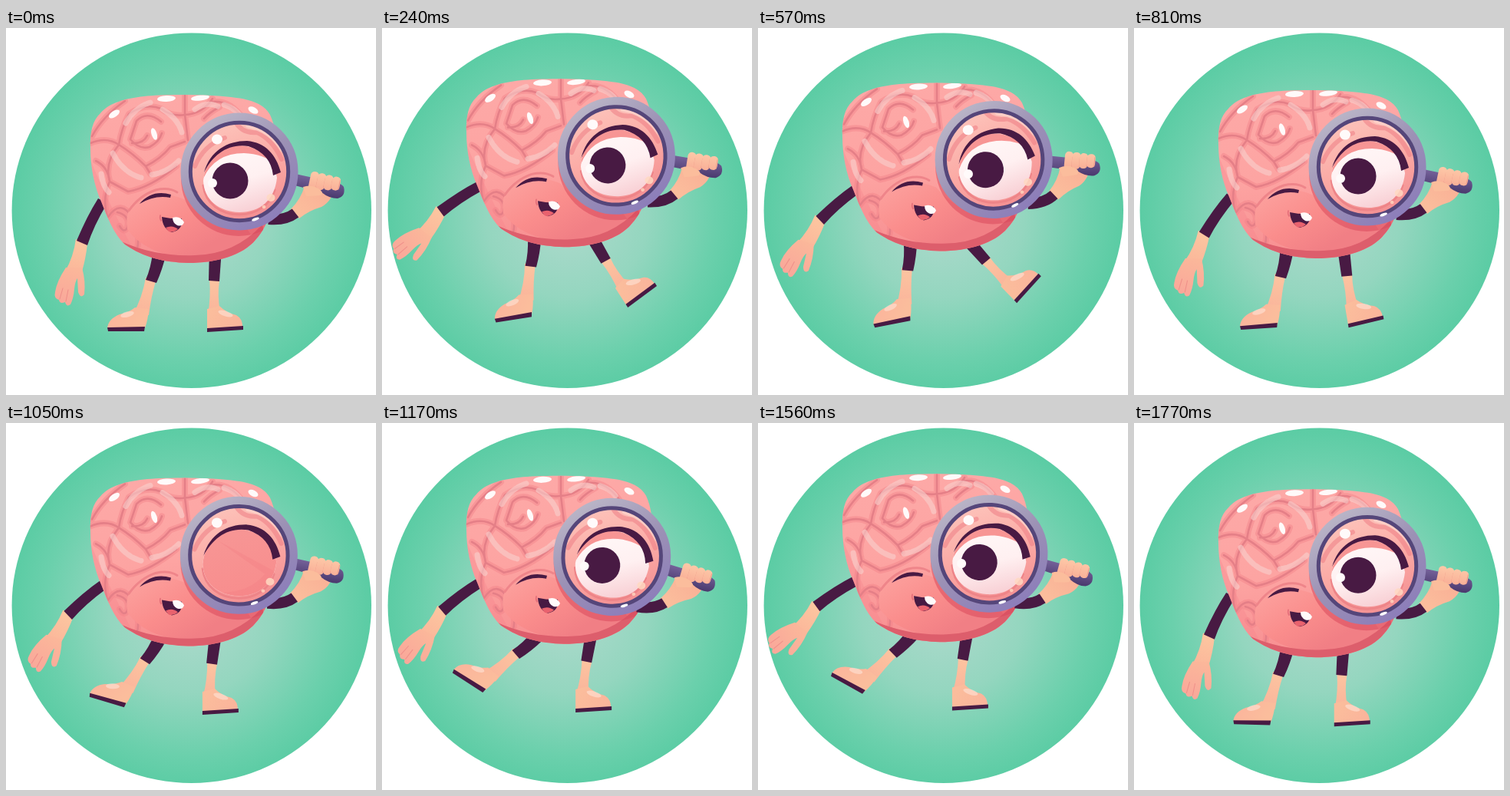
An HTML page with a canvas for the animation above (1800 ms loop, 482 px wide and 478 px high).

```html
<!DOCTYPE html>
<html lang="en">
<head>
<meta charset="utf-8">
<title>Curious brain</title>
<style>
html, body { margin: 0; width: 100%; height: 100%; overflow: hidden; background: #fff; }
canvas { display: block; }
</style>
</head>
<body>
<canvas id="stage" width="482" height="478"></canvas>
<script>
const ctx = document.getElementById('stage').getContext('2d');
const LOOP = 1800, STEP = 30;
const INK = '#481a43', SKIN = '#fbbd9c', SKIN_PINK = '#f9a79a', WHITE = '#fffafa';
const LENS = { x: 304, y: 187 };

const rad = d => d * Math.PI / 180;
const clamp = v => Math.max(0, Math.min(1, v));
const smooth = v => v * v * (3 - 2 * v);

function ramp(x0, y0, x1, y1, ...colors) {
  const g = ctx.createLinearGradient(x0, y0, x1, y1);
  colors.forEach((c, i) => g.addColorStop(i / (colors.length - 1), c));
  return g;
}
function fill(d, color) {
  ctx.fillStyle = color;
  ctx.fill(new Path2D(d));
}
function line(d, color, width, cap = 'round') {
  ctx.strokeStyle = color;
  ctx.lineWidth = width;
  ctx.lineCap = cap;
  ctx.lineJoin = 'round';
  ctx.stroke(new Path2D(d));
}
function oval(x, y, rx, ry, color, turn = 0) {
  ctx.beginPath();
  ctx.ellipse(x, y, rx, ry, rad(turn), 0, Math.PI * 2);
  ctx.fillStyle = color;
  ctx.fill();
}
function ring(r, width, color) {
  ctx.beginPath();
  ctx.arc(LENS.x, LENS.y, r, 0, Math.PI * 2);
  ctx.strokeStyle = color;
  ctx.lineWidth = width;
  ctx.stroke();
}
function group(draw) {
  ctx.save();
  draw();
  ctx.restore();
}
function pivot(x, y, deg) {
  ctx.translate(x, y);
  ctx.rotate(rad(deg));
  ctx.translate(-x, -y);
}

// Two hops in every 900 ms: low, high, low, high, low
function hop(t) {
  const keys = [0, 225, 420, 645, 900], u = t % 900;
  const i = keys.findIndex((k, n) => u >= k && u < keys[n + 1]);
  const v = smooth((u - keys[i]) / (keys[i + 1] - keys[i]));
  return i % 2 ? 1 - v : v;
}

function pose(t) {
  const s = Math.sin(2 * Math.PI * t / LOOP);
  const fwd = Math.max(s, 0), back = Math.max(-s, 0);
  const f4 = fwd ** 4, b4 = back ** 4;
  return {
    h: hop(t),
    left: 45 * back ** 1.45 - 12 * fwd,
    right: 9 * back - 50 * fwd ** 1.4,
    ankle: -9 * back,
    lensX: 4.5 * f4 - 10 * b4,
    lensY: 13 * b4,
    lensTurn: 11 * b4 - 9 * f4,
    blink: clamp(1 - (Math.abs(t - 1050) - 40) / 80)
  };
}

function backdrop() {
  ctx.fillStyle = '#fff';
  ctx.fillRect(0, 0, 482, 478);
  const g = ctx.createRadialGradient(241, 250, 20, 241, 240, 234);
  g.addColorStop(0, '#a9d9ca');
  g.addColorStop(.4, '#94d6bf');
  g.addColorStop(.8, '#6bd0ac');
  g.addColorStop(1, '#5bcca4');
  oval(241.8, 237.7, 234.2, 231.3, g);
}

function legs(p) {
  group(() => {
    pivot(199, 300, p.left);
    fill('M182 325L195 330Q189 350 186 374L165 374Q178 350 182 325Z', ramp(188, 328, 172, 374, '#fcc4a0', '#fab49b'));
    fill('M168 364L186 366Q185 380 181 391L132 391Q133 379 148 373Q161 370 168 364Z', ramp(140, 372, 170, 392, '#fbb59c', SKIN));
    oval(158, 373, 9, 3.5, 'rgba(255,232,220,.55)', -14);
    fill('M132 390L181 389L180 395L133 395Z', INK);
    fill('M191 292L208 296Q204 314 196 332L182 328Q189 312 191 292Z', INK);
  });
  group(() => {
    pivot(272, 292, p.right);
    fill('M265 327L278 329Q275 348 279 370L263 373Q267 350 265 327Z', ramp(270, 328, 270, 372, '#fcc4a0', '#fab49b'));
    group(() => {
      pivot(270, 370, p.ankle);
      fill('M262 366L278 362Q287 371 300 374Q309 379 308 391L262 392Z', ramp(265, 370, 304, 390, SKIN, '#fab49b'));
      oval(286, 372, 10, 3.5, 'rgba(255,232,220,.55)', 18);
      fill('M262 391L309 388L309 393L262 396Z', INK);
    });
    fill('M265 288L281 288L278 330L264 329Z', INK);
  });
}

function leftArm(h) {
  group(() => {
    pivot(124, 228, 31 * h);
    group(() => {
      pivot(98, 279, -11 * h);
      fill('M91 275L106 281Q104 300 99 317L77 317Q88 298 91 275Z', ramp(98, 278, 86, 318, '#fcc6a0', '#fbb79a'));
      group(() => {
        pivot(88, 315, 40 * h ** 3 - 20 * h);
        fill('M78 312L99 312Q104 330 102 347Q97 353 94 344L93 326Q90 330 89 340Q88 352 84 360Q79 364 77 357Q70 360 69 354Q62 352 64 344Q66 330 78 312Z',
          ramp(88, 312, 74, 360, '#fbb79a', SKIN_PINK));
        line('M78 356L81 341M70 353L74 339', '#ee8f89', 1);
      });
    });
    fill('M120 222L132 228Q114 258 106 283L92 277Q106 244 120 222Z', INK);
  });
}

const BODY = 'M180 89C205 86 270 86 300 91C325 94 338 102 344 113C351 128 352 143 352 160C352 220 345 255 325 276C308 296 275 306 237 306C205 305 180 299 155 282C140 268 132 246 124 226C115 206 110 180 110 158C109 135 113 120 123 111C135 97 155 92 180 89Z';
const GROOVES = 'M233 88L233 113Q216 116 202 105Q182 97 160 112Q150 132 147 152Q165 163 182 180Q202 170 214 155L233 148'
  + 'M233 113Q256 112 269 92M269 96Q292 94 309 118M233 113L237 146'
  + 'M202 122Q184 107 170 121L162 145Q174 159 187 155Q200 148 203 137M164 150Q179 151 184 140'
  + 'M110 150Q131 141 147 152Q128 175 135 200L159 213Q188 208 222 180M135 200Q125 222 132 246'
  + 'M117 173Q133 181 135 200M133 246Q150 221 166 249Q176 273 170 290M145 240Q162 244 158 260Q154 268 148 258'
  + 'M112 141Q126 115 155 95M182 180L188 190M278 103Q265 110 258 118';

function body(p) {
  const shape = new Path2D(BODY);
  group(() => {
    ctx.clip(shape);
    ctx.fillStyle = ramp(200, 88, 225, 306, '#fda9a7', '#fda4a2', '#f78e90');
    ctx.fillRect(100, 80, 260, 235);
    fill('M105 160Q130 222 172 300L130 300L95 170Z', 'rgba(243,126,138,.28)');
    line(GROOVES, 'rgba(240,126,134,.4)', 8);
    line(GROOVES, '#e57f87', 2.6);

    // Soft brushed shine
    ctx.setLineDash([9, 3, 5, 2]);
    line('M156 124Q168 103 188 97M204 106Q224 118 229 136M139 163Q153 189 176 195M190 191Q210 188 225 173M246 106Q261 95 276 102M124 190Q126 206 134 214M284 100Q297 104 304 113',
      'rgba(248,208,206,.6)', 7);
    ctx.setLineDash([]);

    fill('M158 262Q153 232 178 222Q203 211 232 223Q263 260 311 257L325 278Q287 305 238 300Q180 294 158 262Z',
      ramp(185, 220, 235, 301, '#fc9e9b', '#fa8d8c', '#f17f85'));
    line('M160 238Q174 218 195 211Q212 207 223 214', '#ef858a', 3);
    fill('M150 278Q195 298 246 296Q298 295 334 256L345 315L150 315Z', '#dd5e6c');

    group(() => {
      ctx.translate(p.lensX, p.lensY);
      oval(LENS.x - 1, LENS.y + 9, 75, 75, 'rgba(218,74,91,.55)');
    });

    oval(141, 112, 8, 4, WHITE, -34);
    oval(209, 92, 12, 4, WHITE, -3);
    oval(253, 91, 12, 3.5, WHITE, -7);
    oval(322, 107, 7, 4, WHITE, 27);
    oval(193, 138, 3.5, 8, WHITE, -18);
  });

  fill('M174 229Q190 210 215 217L214 221Q194 217 174 229Z', INK);
  fill('M203 246Q217 249 229 248Q231 263 216 266Q204 262 203 246Z', INK);
  fill('M208 260Q217 256 224 262Q218 267 212 265Z', '#e9626e');
  fill('M217 247Q227 244 232 253Q230 259 223 257Q217 254 217 247Z', WHITE);
  line('M201 244Q200 248 202 251', '#e36e79', 1.6);
}

function eye(blink) {
  const socket = new Path2D('M257 199C260 166 282 153 306 153C333 155 349 174 353 195C350 224 331 240 304 240C277 239 258 224 257 199Z');
  line('M257 205C260 229 280 243 304 243C327 243 344 230 350 211', '#ee8488', 3);
  group(() => {
    ctx.clip(socket);
    ctx.fillStyle = ramp(285, 160, 310, 242, '#fff7f7', '#fff0f1', '#f8cfd4');
    ctx.fillRect(250, 145, 110, 100);
    oval(292, 199, 23.5, 23.5, INK);
    oval(269, 202, 6, 6, WHITE);

    // Upper lid rests just above the iris and sweeps down to blink
    const y = 82 * blink;
    fill(`M245 140H365V${192 + y}Q345 ${164 + y} 310 ${163 + y}Q272 ${163 + y} 257 ${196 + y}L245 ${196 + y}Z`,
      ramp(280, 155, 305, 242, '#f79695', '#f88d8d'));
    group(() => {
      ctx.globalAlpha = blink;
      fill('M276 168L350 207L350 245L265 235Q315 240 338 211Z', 'rgba(235,113,122,.2)');
    });
  });
  fill('M258 188C266 160 288 147 314 147C338 149 352 165 358 188L348 192Q345 164 316 154C289 150 270 165 258 188Z', INK);
}

function lens(p) {
  group(() => {
    ctx.translate(p.lensX, p.lensY);
    pivot(LENS.x, LENS.y, p.lensTurn);

    // Arm, palm and handle
    fill('M389 206Q384 223 371 236L382 248Q394 238 411 233Q427 224 427 205Z', ramp(385, 242, 416, 207, SKIN, '#f9b096'));
    line('M342 249Q364 251 377 241', INK, 14, 'butt');
    fill('M377 190L414 198Q435 200 440 207Q443 219 432 222Q421 222 411 214L376 205Z', ramp(405, 194, 402, 217, '#75629a', '#4c3b70'));
    [0, 1, 2, 3].forEach(i => {
      const x = 401 + 9.6 * i, y = 199 + 1.2 * i;
      group(() => {
        pivot(x, y, 12);
        ctx.beginPath();
        ctx.roundRect(x - 5.5, y - 12 + i, 11, 24 - i * 2, 5);
        ctx.fillStyle = ramp(x, y - 11, x, y + 12, '#fdc8a7', '#f9ad96');
        ctx.fill();
        line(`M${x + 4.5} ${y - 5}V${y + 7}`, '#ed9687', .8);
      });
    });
    fill('M387 207Q397 203 407 209Q415 214 410 218Q401 219 391 219Z', SKIN);

    group(() => {
      ctx.beginPath();
      ctx.arc(LENS.x, LENS.y, 66, 0, Math.PI * 2);
      ctx.clip();
      ctx.fillStyle = ramp(275, 122, 325, 253, '#fdc4bb', '#fbaaa5', '#f38e91');
      ctx.fillRect(230, 115, 150, 145);
      line('M246 180Q258 152 285 143M297 119Q306 138 327 136Q347 145 359 171', 'rgba(238,126,133,.55)', 6);
      line('M316 126Q346 133 361 158', 'rgba(255,224,216,.55)', 8);
      fill('M240 204Q252 244 295 253L325 251L303 262L246 250Z', 'rgba(255,204,193,.65)');
      eye(p.blink);
      oval(275, 145, 7, 6.5, WHITE);
      oval(345, 221, 5.5, 5, 'rgba(255,218,194,.85)');
      oval(336, 233, 2.4, 2.2, 'rgba(255,218,194,.8)');
    });

    ring(71, 11, ramp(253, 122, 343, 257, '#bbb7c8', '#9c91b5', '#8c7dba'));
    ring(63.7, 5, '#55467a');
    oval(325, 249, 5, 1.8, '#fff', -20);
  });
}

function draw(t) {
  const p = pose(t);
  backdrop();
  group(() => {
    ctx.translate(0, -21 * p.h);
    legs(p);
    leftArm(p.h);
    body(p);
    lens(p);
  });
}

function tick(now) {
  draw(Math.floor(now % LOOP / STEP) * STEP);
  requestAnimationFrame(tick);
}
draw(0);
requestAnimationFrame(tick);
</script>
</body>
</html>
```
